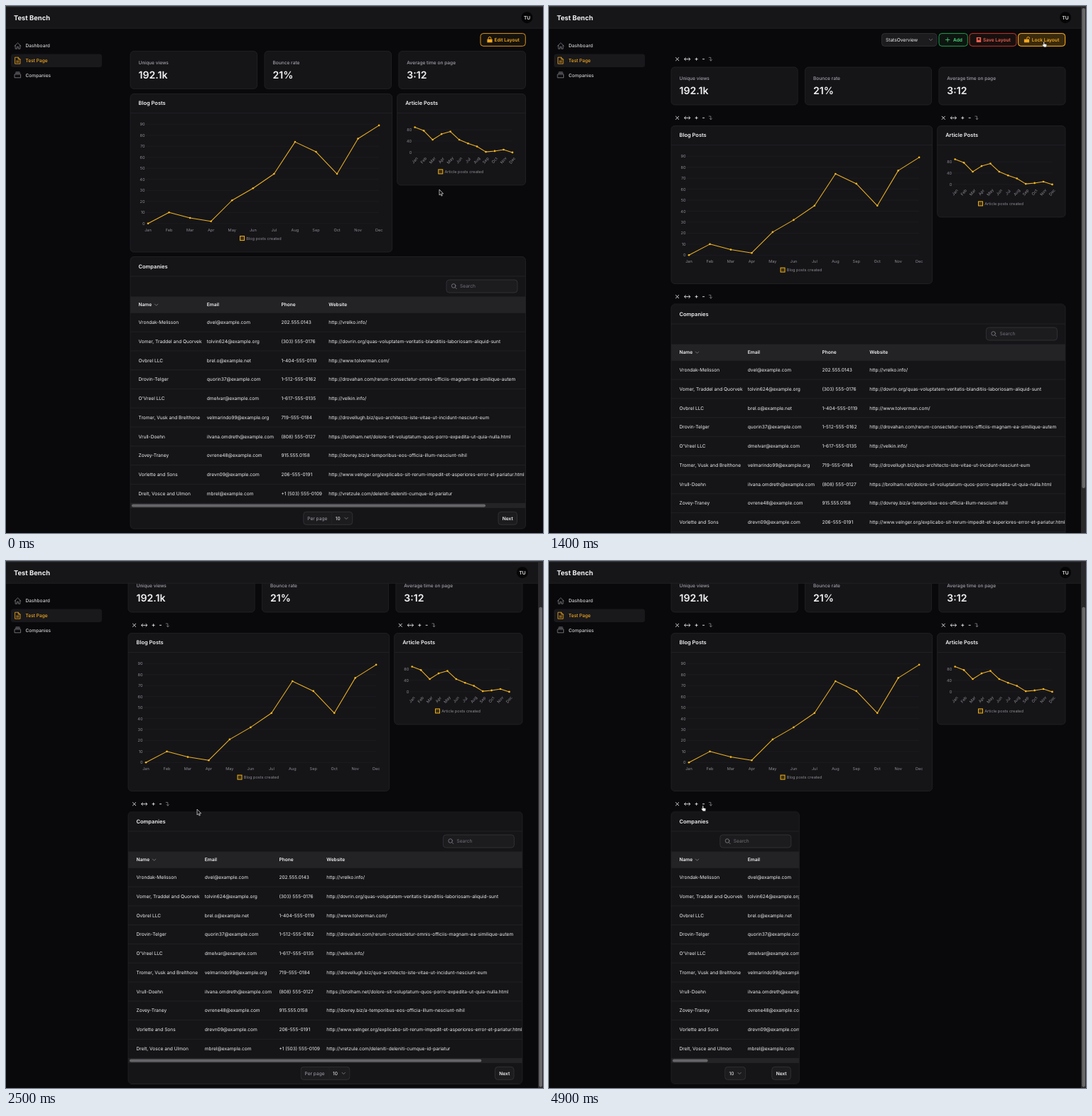
Write an HTML page that moves like this. It is 756 px wide and 741 px high and loops after 5000 ms.

```html
<!DOCTYPE html>
<html lang="en">
<head>
<meta charset="utf-8">
<title>Test Bench</title>
<style>
@property --n { syntax: "<number>"; inherits: true; initial-value: 12; }
@property --s { syntax: "<number>"; inherits: true; initial-value: 0; }
html, body { margin: 0; height: 100%; overflow: hidden; background: #09090b; }
svg { display: block; width: 756px; height: 741px; }
text { font: 400 6.6px Inter, sans-serif; fill: #f1f1f3; text-rendering: geometricPrecision; }
.med { font-weight: 500; }
.semi { font-weight: 600; }
.brand { font-size: 9.4px; font-weight: 700; }
.head { font-size: 7.5px; font-weight: 600; }
.big { font-size: 14.1px; font-weight: 600; }
.dim { fill: #a1a1aa; }
.faint { fill: #71717a; }
.tick { font-size: 5.6px; fill: #8b8b92; }
.mid { text-anchor: middle; }
.end { text-anchor: end; }
.nav { font-weight: 500; fill: #cfcfd4; }
.nav.on, .amber { fill: #f5a91d; }
.green { fill: #4ade80; }
.red { fill: #f2604f; }
.card { fill: #151518; }
.edge { fill: none; stroke: #252528; stroke-width: .8; }
.rule { stroke: #242427; stroke-width: .8; fill: none; }
.grid { stroke: #1f1f23; stroke-width: .7; }
.field { fill: #1c1c1f; stroke: #36363a; stroke-width: .8; }
.ico { fill: none; stroke: #85858c; stroke-width: .8; stroke-linecap: round; stroke-linejoin: round; }
.tool { fill: none; stroke: #e8e8ea; stroke-width: .9; }
.line { fill: none; stroke: #eeb020; stroke-width: 1.05; stroke-linejoin: round; }
.dot { fill: #f8b822; }

/* table card: everything follows its width, --u */
.a { --u: 556.5; }
.b { --u: calc(var(--n) * 46.83 - 7); }
.fit { width: calc(var(--u) * 1px); }
.thumb { width: calc(var(--u) * var(--u) * 1px / 618 - 3px); }
.right { transform: translateX(calc(var(--u) * 1px)); }
.centre { transform: translateX(calc(var(--u) * .5px)); }
.slim { opacity: 0; }
.scroll { transform: translateY(calc(var(--s) * -1px)); }
.page-thumb { transform: translateY(calc(var(--s) * .92px)); }

svg { animation: cols 5s step-end infinite, scroll 5s step-end infinite; }
.a { animation: locked 5s step-end infinite; }
.b { animation: editing 5s step-end infinite; }
.b .wide { animation: wide 5s step-end infinite; }
.b .slim { animation: slim 5s step-end infinite; }
.hover { animation: hover 5s step-end infinite; }
#cursor { animation: move 5s step-end infinite; }
#hand { animation: hand 5s step-end infinite; }
#arrow { animation: arrow 5s step-end infinite; }

@keyframes locked { 0% { opacity: 1 } 22%, 100% { opacity: 0 } }
@keyframes editing { 0% { opacity: 0 } 22%, 100% { opacity: 1 } }
@keyframes hover { 0% { opacity: 0 } 16% { opacity: 1 } 30%, 100% { opacity: 0 } }
@keyframes hand { 0% { opacity: 0 } 16% { opacity: 1 } 30% { opacity: 0 } 62%, 100% { opacity: 1 } }
@keyframes arrow { 0% { opacity: 1 } 16% { opacity: 0 } 30% { opacity: 1 } 62%, 100% { opacity: 0 } }
@keyframes wide { 0% { opacity: 1 } 90%, 100% { opacity: 0 } }
@keyframes slim { 0% { opacity: 0 } 90%, 100% { opacity: 1 } }
@keyframes scroll {
  0% { --s: 0 } 42% { --s: 3 } 44% { --s: 10 } 46% { --s: 22.7 } 48% { --s: 47 } 50%, 100% { --s: 67 }
}
@keyframes cols {
  0% { --n: 12 } 80% { --n: 11 } 82% { --n: 10 } 84% { --n: 9 } 86% { --n: 8 }
  88% { --n: 7 } 90% { --n: 6 } 92% { --n: 5 } 94%, 100% { --n: 4 }
}
@keyframes move {
  0% { transform: translate(610px, 258px) }
  6% { transform: translate(614px, 252px) }
  8% { transform: translate(636px, 205px) }
  10% { transform: translate(668px, 130px) }
  12% { transform: translate(690px, 78px) }
  14% { transform: translate(697px, 60px) }
  16% { transform: translate(695px, 50px) }
  30% { transform: translate(680px, 80px) }
  32% { transform: translate(632px, 150px) }
  34% { transform: translate(560px, 240px) }
  36% { transform: translate(490px, 315px) }
  38% { transform: translate(440px, 352px) }
  40% { transform: translate(424px, 350px) }
  42% { transform: translate(420px, 338px) }
  46% { transform: translate(419px, 332px) }
  48% { transform: translate(345px, 342px) }
  50% { transform: translate(269px, 349px) }
  52% { transform: translate(256px, 351px) }
  54% { transform: translate(246px, 351px) }
  56% { transform: translate(236px, 349px) }
  58% { transform: translate(228px, 347px) }
  60% { transform: translate(222px, 345px) }
  62% { transform: translate(217px, 343px) }
  66% { transform: translate(213px, 341px) }
  78% { transform: translate(214px, 342px) }
  86% { transform: translate(215px, 343px) }
  94%, 100% { transform: translate(215px, 344px) }
}
</style>
</head>
<body>
<svg id="stage" viewBox="0 0 756 741"></svg>
<script>
const months = "Jan Feb Mar Apr May Jun Jul Aug Sep Oct Nov Dec".split(" ");
const posts = [0, 10, 5, 2, 21, 32, 45, 74, 65, 45, 77, 89];
const columns = [["Name", 11.5], ["Email", 107.8], ["Phone", 212.4], ["Website", 279.3]];
const rows = `Vrondak-Melisson|dvel@example.com|202.555.0143|http://vrelko.info/
Vomer, Traddel and Quorvek|tolvin624@example.org|(303) 555-0176|http://dovrin.org/quas-voluptatem-veritatis-blanditiis-laboriosam-aliquid-sunt
Ovbrel LLC|brel.o@example.net|1-404-555-0119|http://www.tolverman.com/
Drovin-Telger|quorin37@example.com|1-512-555-0162|http://drovahan.com/rerum-consectetur-omnis-officiis-magnam-ea-similique-autem
O'Vreel LLC|dmelvar@example.com|1-617-555-0135|http://velkin.info/
Tromer, Vusk and Brelthone|velmarindo99@example.org|719-555-0184|http://drovellugh.biz/quo-architecto-iste-vitae-ut-incidunt-nesciunt-eum
Vrull-Doehn|ilvana.omdreth@example.com|(808) 555-0127|https://brolham.net/dolore-sit-voluptatum-quos-porro-expedita-ut-quia-nulla.html
Zovey-Traney|ovrene48@example.com|915.555.0158|http://dovrey.biz/a-temporibus-eos-officia-illum-nesciunt-nihil
Vorlette and Sons|drevn09@example.com|206-555-0191|http://www.velnger.org/explicabo-sit-rerum-impedit-et-asperiores-error-et-pariatur.html
Drelt, Vosce and Ulmon|mbrel@example.com|+1 (503) 555-0109|http://vretzule.com/deleniti-deleniti-cumque-id-pariatur`
  .split("\n").map(r => r.split("|"));

const text = (x, y, s, cls = "", more = "") => `<text x="${x}" y="${y}" class="${cls}" ${more}>${s}</text>`;
const rect = (x, y, w, h, r, more) => `<rect x="${x}" y="${y}" width="${w}" height="${h}" rx="${r}" ${more}/>`;
const path = (d, cls, more = "") => `<path d="${d}" class="${cls}" ${more}/>`;
const at = (x, y, body, cls = "") => `<g transform="translate(${x} ${y})" class="${cls}">${body}</g>`;
const chevron = (x, y) => path(`M${x - 2.2} ${y - 1}l2.2 2.2 2.2-2.2`, "ico");
const box = (w, h) => rect(0, 0, w, h, 5, 'class="card"') + rect(0, 0, w, h, 5, 'class="edge"');

const tools = (x, y) => at(x, y,
  path("M6.2-2.4l4.8 4.8M11-2.4L6.2 2.4M18.6 0h8.2M20.7-2.1L18.5 0l2.2 2.1M24.7-2.1L26.9 0l-2.2 2.1M33.6 0h4M35.6-2v4M44 0h3", "tool") +
  path("M53.2-2.3h2.6V2.3M54.2.8l1.6 1.7 1.6-1.7", "ico"));

const stat = (x, y, w, label, value) => at(x, y,
  box(w, 53) + text(11.5, 18.2, label, "med dim") + text(11.5, 38.3, value, "big"));

function plot(data, x, step, zero, unit, marks, width) {
  const pts = data.map((v, i) => [x + i * step, zero - v * unit]);
  return marks.map(m => path(`M${x - 4} ${zero - m * unit}H${x + width}`, "grid") +
      text(x - 4.5, zero - m * unit + 2, m, "tick end")).join("") +
    path("M" + pts.join("L"), "line") +
    pts.map(([cx, cy]) => `<circle cx="${cx}" cy="${cy}" r="1.3" class="dot"/>`).join("");
}
const legend = (x, y, s) =>
  rect(x, y, 6, 6, 0, 'fill="#3d2f0c" stroke="#eeb020"') + text(x + 8.7, y + 5.1, s, "tick");

function blog(x, y, w, h) {
  const step = (w - 43.5) / 11, zero = h - 40.2;
  return at(x, y, box(w, h) + text(11.5, 15.9, "Blog Posts", "head") + path(`M0 27H${w}`, "rule") +
    plot(posts, 25, step, zero, (zero - 42.8) / 90, [...Array(10).keys()].map(i => i * 10), step * 11) +
    months.map((m, i) => text(25 + i * step, zero + 10.7, m, "tick mid")).join("") +
    legend(w / 2 - 29.8, h - 22.4, "Blog posts created"));
}
function article(x, y, w, h) {
  const step = (w - 43.5) / 11;
  return at(x, y, box(w, h) + text(11.5, 15.9, "Article Posts", "head") + path(`M0 27H${w}`, "rule") +
    plot([...posts].reverse(), 25, step, 82.4, .397, [0, 40, 80], step * 11) +
    months.map((m, i) => {
      const cx = 25 + i * step;
      return text(cx, 95.3, m, "tick mid", `transform="rotate(-50 ${cx} 93.6)"`);
    }).join("") +
    legend(w / 2 - 32.3, 106.4, "Article posts created"));
}

function table(x, y, id) {
  const fit = (top, h, r, cls) => `<rect y="${top}" height="${h}" rx="${r}" class="fit ${cls}"/>`;
  const step = 26.78, first = 92.2;
  const body = rows.map((row, i) => {
    const cy = first + i * step;
    return (i ? path(`M0 ${cy - step / 2}H560`, "rule") : "") +
      row.map((s, c) => text(columns[c][1], cy + 2.3, s)).join("");
  }).join("");
  const search = rect(-111.5, 32.5, 100, 18, 4, 'class="field"') +
    '<circle cx="-101.3" cy="41" r="2.8" class="ico"/>' + path("M-99.2 43.1l2 2", "ico") +
    text(-92.5, 43.9, "Search", "faint");
  const next = rect(-38.5, 358.8, 26.5, 18, 4, 'class="field"') + text(-25.2, 370.2, "Next", "semi mid");
  const wide = rect(-34.5, 358.8, 69, 18, 4, 'class="field"') + path("M5.5 358.8v18", "rule") +
    text(-29, 370.2, "Per page", "dim") + text(10.5, 370.2, "10") + chevron(25.8, 367.8);
  const slim = rect(-14.5, 358.8, 29, 18, 4, 'class="field"') + text(-8.6, 370.2, "10") + chevron(6, 367.8);
  return at(x, y, fit(0, 382.5, 5, "card") +
    `<clipPath id="${id}">${fit(0, 382.5, 5, "")}</clipPath><g clip-path="url(#${id})">` +
    text(11.5, 16.5, "Companies", "head") + path("M0 27.5H560", "rule") +
    rect(0, 56, 560, 23.3, 0, 'fill="#232326"') +
    columns.map(([s, cx]) => text(cx, 69.8, s, "semi")).join("") + chevron(36.6, 67.6) + body +
    rect(0, 346.4, 560, 7, 0, 'fill="#242427"') +
    '<rect x="2" y="347.9" height="4" rx="2" class="thumb" fill="#66666a"/>' +
    `<g class="right">${search}${next}</g>` +
    `<g class="centre"><g class="wide">${wide}</g><g class="slim">${slim}</g></g></g>` +
    fit(0, 382.5, 5, "edge"));
}

function lock(x, open) {
  return path(`M${x - 3.6} 46.7h7.2v4.6h-7.2z`, "amber") +
    path(open ? `M${x + .3} 46.7v-1.4a1.8 1.8 0 0 1 3.6 0v.8` : `M${x - 1.9} 46.7v-1.3a1.9 1.9 0 0 1 3.8 0v1.3`,
      "", 'fill="none" stroke="#f5a91d"');
}
const button = (x, w, colour, fill) => rect(x, 38.6, w, 17.8, 4, `fill="${fill}" stroke="${colour}"`);
const glow = (x, w) => rect(x, 38.6, w, 17.8, 4, 'class="hover" fill="#3a2a0d" stroke="#f5a91d"');

const panels = (x, W, stats, charts, h, tableY, id) => {
  const step = (W + 10.3) / 3, col = (W + 7) / 12;
  return [["Unique views", "192.1k"], ["Bounce rate", "21%"], ["Average time on page", "3:12"]]
      .map(([l, v], i) => stat(x + i * step, stats, step - 10.3, l, v)).join("") +
    blog(x, charts, col * 8 - 7, h) +
    article(x + col * 8, charts, col * 4 - 7, 128.4) +
    table(x, tableY, id);
};

const locked = button(668, 63.3, "#d9921a", "#15120d") + glow(668, 63.3) + lock(681, false) +
  text(687.5, 49.9, "Edit Layout", "semi amber") + panels(175, 556.5, 63.5, 123.5, 222.5, 352.5, "clipA");

const editing = rect(468.5, 38.6, 77.5, 17.8, 4, 'class="field"') + text(474, 49.9, "StatsOverview") + chevron(537.5, 47.4) +
  button(549, 40.3, "#1f9d4d", "#0e1510") + path("M558.5 47.5h5.4M561.2 44.8v5.4", "ico", 'style="stroke:#4ade80"') +
  text(569, 49.9, "Add", "semi green") +
  button(592, 66, "#c2362b", "#17100f") +
  path("M601.8 44h6.4v7h-6.4zM603.6 45.2v2.6h2.8v-2.6z", "red", 'fill-rule="evenodd"') +
  text(611, 49.9, "Save Layout", "semi red") +
  button(660.6, 66, "#d9921a", "#15120d") + glow(660.6, 66) + lock(672.5, true) +
  text(679.7, 49.9, "Lock Layout", "semi amber") +
  tools(172, 74.7) + tools(172, 157.3) + tools(546.7, 157.3) + tools(172, 408.7) +
  panels(172, 555, 86, 168.5, 222, 419.5, "clipB");

const sidebar = rect(7, 67.5, 128, 18.6, 3.5, 'fill="#19191c"') +
  path("M12 56.3l4.5-4.4 4.5 4.4M13.2 55.4v4.8h2.3v-2.9h2v2.9h2.3v-4.8", "ico") +
  path("M13 72.2h4.2l2.8 2.8v6.2h-7zM17.2 72.2v2.8h2.8M14.7 77.2h3.4M14.7 79h3.4", "ico", 'style="stroke:#f5a91d"') +
  path("M12.4 96.2h8.2v4.6h-8.2zM13.2 94.5h6.6M14 92.9h5", "ico") +
  text(27.5, 58.3, "Dashboard", "nav") + text(27.5, 79, "Test Page", "nav on") + text(27.5, 99.6, "Companies", "nav");

const avatar = x => `<circle cx="${x}" cy="16.2" r="8" fill="#050506"/>` + text(x, 18.6, "TU", "semi mid");

document.getElementById("stage").innerHTML = rect(0, 0, 756, 741, 0, 'fill="#09090b"') + sidebar +
  `<g class="a">${locked}</g><g class="b"><g class="scroll">${editing}</g></g>` +
  rect(0, 0, 756, 31.5, 0, 'fill="#161619"') + path("M0 31.3H756", "rule") +
  rect(0, 0, 756, 1.4, 0, 'fill="#39393b"') + text(11, 19.8, "Test Bench", "brand") +
  `<g class="a">${avatar(733.5)}</g><g class="b">${avatar(727)}` +
  rect(749, 1.4, 7, 740, 0, 'fill="#29292b"') +
  rect(750.4, 3, 4.6, 675, 2.3, 'class="page-thumb" fill="#69696c"') + "</g>" +
  '<g id="cursor">' +
  path("M0 0V8L1.8 6.4 3 9.1 4.3 8.5 3.1 5.9H5.7Z", "", 'id="arrow" fill="#111" stroke="#e4e4e4" stroke-width=".7"') +
  path("M1 .8a.7.7 0 0 1 1.4 0V3.2L5 3.8a.9.9 0 0 1 .8 1L5.3 7.8H1.8L-.4 4.9a.7.7 0 0 1 1.4-.5Z", "",
    'id="hand" fill="#fff" stroke="#222" stroke-width=".5"') + "</g>";
</script>
</body>
</html>
```
